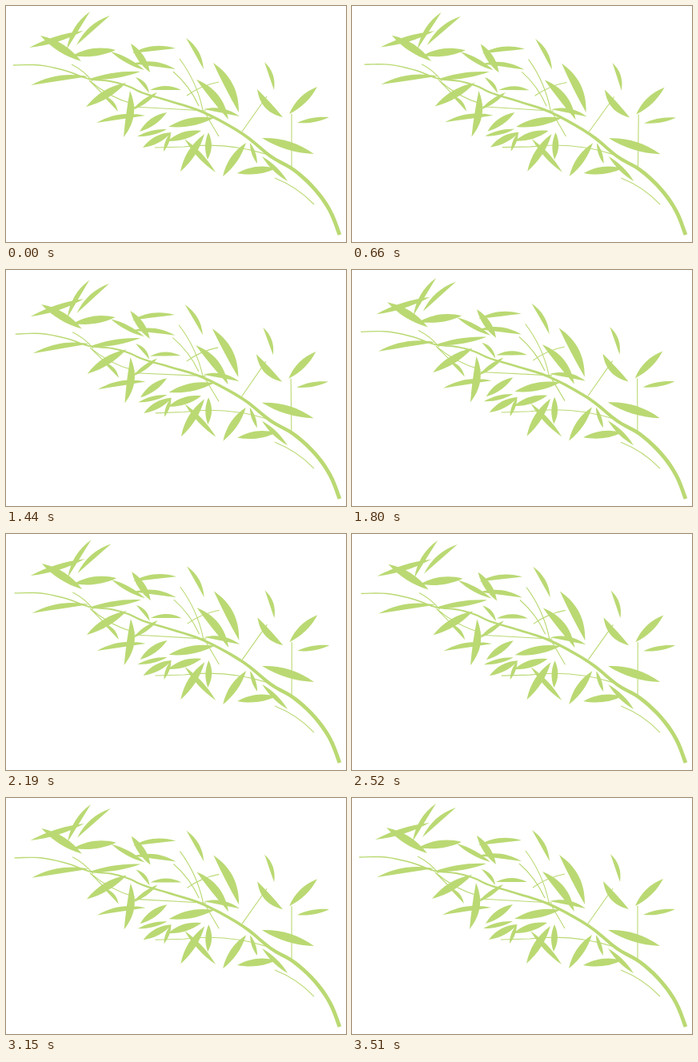
Animation of 425x295 px, one loop 3.54 s. Source, as an HTML page:

```html
<!DOCTYPE html>
<html lang="en">
<head>
<meta charset="utf-8">
<title>Bamboo branch</title>
<style>
html, body { margin: 0; width: 100%; height: 100%; overflow: hidden; background: #fff; }
svg { display: block; width: 425px; height: 295px; }
</style>
</head>
<body>
<svg viewBox="0 0 425 295">
  <path id="body" fill="#bad973"/>
  <path id="twigs" fill="none" stroke="#bad973" stroke-width="1.1"/>
</svg>
<script>
const LOOP = 3540, STEP = 30, HOLD = 180;
const ROOT = [417, 285];

// Each leaf runs from one end to the other and bows to its left;
// width and bow belong to the kind and grow with the length.
const kinds = [
  { width: 6, bow: 0, leaves: [
    [29, 52, 97, 31], [131, 57, 173, 80], [102, 92, 168, 82], [158, 130, 189, 108],
    [164, 163, 201, 154], [197, 182, 206, 158], [223, 166, 262, 208],
    [305, 171, 314, 197], [320, 188, 352, 219], [364, 146, 404, 139]] },
  { width: 5.6, bow: 2.8, leaves: [
    [76, 54, 105, 7], [88, 49, 130, 12], [158, 59, 212, 53], [158, 72, 212, 79],
    [31, 99, 103, 88], [113, 146, 174, 137], [162, 89, 179, 109], [180, 105, 219, 105],
    [225, 40, 247, 79], [247, 129, 292, 138], [323, 70, 335, 105], [121, 112, 140, 132]] },
  { width: 9.2, bow: .6, leaves: [
    [43, 37, 94, 69], [83, 62, 137, 55], [156, 47, 180, 83], [100, 126, 150, 96],
    [167, 157, 201, 133], [203, 151, 260, 140], [171, 177, 207, 158], [202, 169, 244, 156],
    [218, 207, 248, 160], [253, 158, 252, 192], [271, 213, 300, 171], [289, 209, 338, 203],
    [320, 165, 385, 185], [354, 135, 389, 101]] },
  { width: 9, bow: 3.8, leaves: [
    [155, 106, 147, 164], [259, 71, 291, 133], [238, 92, 278, 142], [346, 139, 314, 104]] }
];

const straightTwigs = [[357, 135, 357, 204], [326, 113, 295, 157], [186, 177, 222, 176],
  [160, 126, 250, 131], [249, 134, 266, 163], [104, 93, 126, 115]];
const curvedTwigs = [[336, 215, 385, 248], [222, 176, 328, 186], [82, 73, 108, 94],
  [160, 123, 104, 93], [217, 66, 246, 130], [209, 82, 241, 125], [226, 112, 266, 95]];

const stem = [[9, 74], [42, 74], [75, 81], [103, 91], [130, 94], [152, 100], [172, 109],
  [205, 119], [247, 133], [296, 160], [331, 188], [360, 205], [386, 229], [405, 256], [417, 286]];

// Time, turn of the branch, pull towards the root
const sway = [[150, 0, 0], [660, .0185, .0105], [990, -.0035, .0105], [1440, -.021, .0093],
  [2190, .004, .0028], [2820, 0, .0062], [LOOP, 0, 0]];

function slope(i, k) {
  const p = sway[i - 1], n = sway[i + 1];
  return p && n ? (n[k] - p[k]) / (n[0] - p[0]) : 0;
}

// Smooth curve through the sway keys
function swayAt(t, k) {
  if (t < HOLD) return 0;
  let i = 0;
  while (t > sway[i + 1][0]) i++;
  const p = sway[i], q = sway[i + 1], span = q[0] - p[0];
  const s = (t - p[0]) / span, e = s * s * (3 - 2 * s);
  return p[k] + (q[k] - p[k]) * e
    + span * s * (1 - s) * ((1 - s) * slope(i, k) - s * slope(i + 1, k));
}

// Moves a point: the farther from the root, the stronger
function bender(t) {
  const turn = swayAt(t, 1), pull = swayAt(t, 2);
  return ([x, y]) => {
    const u = ROOT[0] - x, v = ROOT[1] - y, r = Math.hypot(u, v) / 400;
    const dx = pull * u + turn * (v - .35 * u), dy = pull * v - .4 * turn * u;
    return (x + dx * r).toFixed(2) + ' ' + (y + dy * r).toFixed(2);
  };
}

// Point a fraction f along a line, set off to its right
function beside([x0, y0, x1, y1], f, off) {
  const dx = x1 - x0, dy = y1 - y0, len = Math.hypot(dx, dy);
  return [x0 + dx * f - dy / len * off, y0 + dy * f + dx / len * off];
}

const length = l => Math.hypot(l[2] - l[0], l[3] - l[1]);

function leafPath(leaf, width, bow, at) {
  const size = (length(leaf) / 50) ** .4 / .75;
  const left = (-bow - width / 2) * size, right = (width / 2 - bow) * size;
  const pt = (f, off) => at(beside(leaf, f, off));
  return `M${pt(0, 0)}C${pt(.34, left)} ${pt(.66, left)} ${pt(1, 0)}`
    + `C${pt(.66, right)} ${pt(.34, right)} ${pt(0, 0)}Z`;
}

function twigPath(twig, bow, at) {
  const pt = (f, off) => at(beside(twig, f, off));
  return `M${pt(0, 0)}Q${pt(.5, -bow * length(twig))} ${pt(1, 0)}`;
}

function spline(pts, n) {
  const out = [];
  for (let i = 0; i < pts.length - 1; i++) {
    const p = pts[i], q = pts[i + 1], o = pts[i - 1] || p, z = pts[i + 2] || q;
    for (let j = 0; j < n; j++) {
      const s = j / n;
      out.push([0, 1].map(k => p[k] + .5 * s * (q[k] - o[k]
        + s * (2 * o[k] - 5 * p[k] + 4 * q[k] - z[k] + s * (3 * (p[k] - q[k]) + z[k] - o[k])))));
    }
  }
  return [...out, pts[pts.length - 1]];
}

// Outline of the stem, thickening towards the root
const line = spline(stem, 5);
const edge = side => line.map((p, i) => {
  const a = line[Math.max(0, i - 1)], b = line[Math.min(line.length - 1, i + 1)];
  const half = Math.min(2.4, .65 + 2.1 * (p[0] / ROOT[0]) ** 1.6);
  const [x, y] = beside([...a, ...b], 0, side * half);
  return [p[0] + x - a[0], p[1] + y - a[1]];
});
const outline = [...edge(-1), ...edge(1).reverse()];

const bodyEl = document.getElementById('body');
const twigsEl = document.getElementById('twigs');

function draw(t) {
  const at = bender(t);
  const leaves = kinds.flatMap(k => k.leaves.map(l => leafPath(l, k.width, k.bow, at)));
  bodyEl.setAttribute('d', 'M' + outline.map(at).join('L') + 'Z' + leaves.join(''));
  twigsEl.setAttribute('d', straightTwigs.map(w => twigPath(w, 0, at)).join('')
    + curvedTwigs.map(w => twigPath(w, .11, at)).join(''));
}

const start = performance.now();
function tick() {
  const t = (performance.now() - start) % LOOP;
  draw(Math.floor(t / STEP) * STEP);
  requestAnimationFrame(tick);
}
draw(0);
requestAnimationFrame(tick);
</script>
</body>
</html>
```
